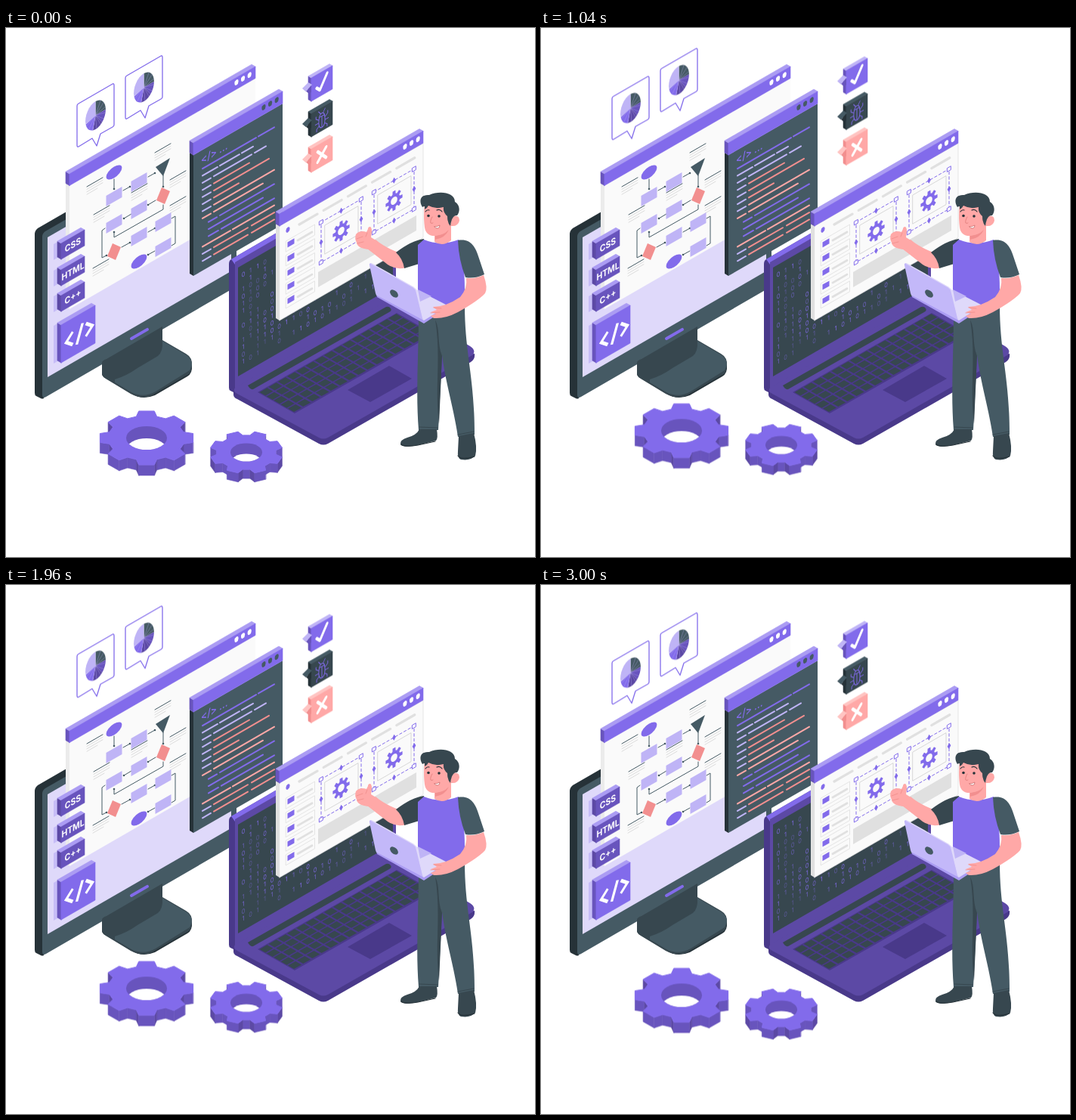
Animation of 700 by 700 pixels, one loop 3040 ms. Source, as an HTML page:

```html
<!DOCTYPE html>
<html lang="en">
<head>
<meta charset="utf-8">
<title>Isometric web development</title>
<style>
html, body { margin: 0; width: 100%; height: 100%; overflow: hidden; background: #fff; }
svg { display: block; width: 100vw; height: 100vh; }
text { font-family: Inter, Arial, sans-serif; }
.float { animation: float 3040ms linear -70ms infinite; }
@keyframes float {
  0%, 100% { transform: translateY(.6px); }
  50% { transform: translateY(-13.4px); }
}
</style>
</head>
<body>
<svg id="stage" viewBox="0 0 700 700" fill="none" stroke-linecap="round" stroke-linejoin="round"></svg>
<script>
const K = 0.577;
const C = {
  purple: '#826beb', light: '#ab9cf3', lilac: '#bfb4f6', pale: '#dfd9fa', deep: '#6854bd',
  plum: '#5c49a5', night: '#49398a', slate: '#455a64', dark: '#37474f', ink: '#263238',
  coral: '#f28f8f', pink: '#ffa8a7', blush: '#ffc4c2', paper: '#fafafa', grey: '#e0e0e0'
};

const path = (d, fill, extra = '') => `<path d="${d}" fill="${fill}" ${extra}/>`;
const line = (d, color, w = 1, extra = '') => `<path d="${d}" stroke="${color}" stroke-width="${w}" ${extra}/>`;
const quad = (x, y, w, h) => `M${x} ${y}l${w} ${-w * K}v${h}l${-w} ${w * K}z`;
const para = (x, y, w, h, fill, extra) => path(quad(x, y, w, h), fill, extra);
const seg = (x, y, w, color, width) => line(`M${x} ${y}l${w} ${-w * K}`, color, width);
const iso = (x, y, body) => `<g transform="matrix(.866 -.5 0 1 ${x} ${y})">${body}</g>`;

// Upright panel with a visible top and left side
function slab(x, y, w, h, d, front, top, side) {
  return path(`M${x} ${y}l${-d} ${-d * K}v${h}l${d} ${d * K}z`, side, `stroke="${side}" stroke-width=".6"`) +
    path(`M${x} ${y}l${-d} ${-d * K}l${w} ${-w * K}l${d} ${d * K}z`, top, `stroke="${top}" stroke-width=".6"`) +
    para(x, y, w, h, front, `stroke="${front}" stroke-width=".6"`);
}

const dots = (x, y, fill) => [0, 1, 2].map(i =>
  iso(x + i * 8.6, y - i * 4.9, `<ellipse rx="3" ry="3.5" fill="${fill}"/>`)).join('');

function gearPoints(R, r, rot, sy) {
  const pts = [];
  for (let i = 0; i < 8; i++) {
    for (const [a, q] of [[-15.5, r], [-9.5, R], [9.5, R], [15.5, r]]) {
      const t = (i * 45 + rot + a) * Math.PI / 180;
      pts.push([q * Math.cos(t), q * Math.sin(t) * sy]);
    }
  }
  return pts;
}
const poly = pts => 'M' + pts.map(p => p.map(n => n.toFixed(2)).join(' ')).join('L') + 'z';

function monitor() {
  return path('M38 273q0-5 4-8L295 119l10 7L52 272l-2 218q-2 1-4 0l-6-3q-2-1-2-4z', C.ink) +
    path('M48 276q0-4 4-7L305 124v218L53 488q-5 3-5-3z', C.slate) +
    para(55, 277, 243, 185, C.pale) +
    seg(166, 411, 21, C.purple, 4) +
    path('M127 443v14q0 4 4 6l35 21q14 9 31 2l43-25q7-4 6-15l-10-8z', C.ink) +
    path('M127 443q0-3 6-5l74-43v18l31 18q9 5 8 16t-6 12l-43 25q-14 9-32 0l-33-20q-5-3-5-7z', C.dark) +
    path('M144 465q16-5 30-15l27-16q7-6 6-20l32 19q11 8 4 20l-45 28q-16 9-32 1l-22-13z', C.slate);
}

function note(x, y) {
  let s = seg(x, y, 21, C.slate, 1);
  for (let i = 1; i < 4; i++) s += seg(x, y + i * 3.4, i === 3 ? 14 : 21, '#cfcfcf', .7);
  return s;
}

function flowchart() {
  let s = para(84, 208, 246, 164, C.paper) +
    path('M79 205l5 3v164l-5-3z', '#ebebeb') +
    slab(84, 193, 246, 15.5, 5, C.purple, C.light, C.deep) + dots(305, 72, '#fff');
  for (const [x, y] of [[107, 210], [197, 165], [217, 201], [217, 235], [116, 247], [166, 218], [115, 318]]) s += note(x, y);
  s += line('M143 200v13M155 215l9-5M188 197l9-5M208 195v15M198 228l-10 6M166 246l-10 6' +
    'M208 234v6L143 277v-7M131 265l-4 3v36l6-3M219 252l5-3v36l-5 3M153 290l11-6M188 270l9-5M197 295l-9 5', C.slate, 1);
  const heads = [[143, 213], [164, 210], [197, 192], [208, 210], [188, 234], [156, 252], [143, 270], [133, 301], [164, 284], [197, 265], [188, 300]];
  s += heads.map(([x, y]) => `<circle cx="${x}" cy="${y}" r="1.3" fill="${C.slate}"/>`).join('');
  for (const [x, y] of [[143, 223], [176, 204], [143, 259], [176, 240], [176, 276], [208, 257], [208, 290]])
    s += para(x - 10.5, y - 1, 21, 14, C.lilac);
  for (const [x, y] of [[143, 191], [176, 309]])
    s += iso(x, y, `<ellipse rx="12" ry="7.4" fill="${C.purple}"/>`);
  for (const [x, y] of [[208, 222], [143, 296]])
    s += path(`M${x - 9} ${y + 6}l7-17l11 5l-7 17z`, C.coral);
  return s + path('M198 184l19-12l-9 24z', C.slate);
}

function codeWindow() {
  const { purple: p, lilac: l, coral: c, pink: k } = C;
  const rows = [
    [p, 260, 331, p, 334, 355], [l, 260, 280, l, 283, 309, l, 312, 327],
    [l, 260, 271, l, 275, 325, l, 329, 344], [l, 260, 271, c, 275, 322],
    [l, 260, 271, c, 275, 348], [l, 260, 271, c, 275, 308], [l, 260, 271, k, 275, 355],
    [k, 260, 271, k, 275, 340], [p, 268, 279, p, 283, 355], [p, 268, 340],
    [p, 268, 281, p, 285, 355], [k, 260, 297, k, 300, 355],
    [l, 260, 271, c, 275, 320, c, 325, 355], [l, 260, 271, c, 275, 320, c, 325, 355]
  ];
  let s = path('M243 165l5 3v160l-5-3z', C.ink) + para(248, 168, 118, 160, C.slate) +
    slab(248, 152, 118, 16, 5, C.purple, C.light, C.deep) + dots(341, 105, C.slate) +
    iso(258, 180, `<text font-size="14" font-weight="600" fill="${p}">&lt;/&gt; …</text>`);
  rows.forEach((row, j) => {
    for (let i = 0; i < row.length; i += 3) {
      const x = row[i + 1];
      s += seg(x, 193 + j * 9.4 - (x - 248) * K, row[i + 2] - x, row[i], 2);
    }
  });
  return s;
}

function tag(y, w, h, front, side) {
  return para(63, y + 1, w, h, C.lilac, 'opacity=".75"') +
    slab(73, y, w, h, 5, front, C.light, side);
}

function tags() {
  let s = '';
  for (const [y, label] of [[285, 'CSS'], [320, 'HTML'], [354, 'C++']])
    s += tag(y, 31, 21, C.deep, C.plum) + iso(88.5, y + 6,
      `<text font-size="12" font-weight="700" fill="#fff" text-anchor="middle">${label}</text>`);
  return s + tag(393, 45, 50, C.purple, C.deep) + iso(97, 405,
    line('M-10-8L-20 1L-10 9M-4 12L5-12M10-9L20-1L10 8', '#fff', 4.2, 'stroke-linecap="butt" stroke-linejoin="miter"'));
}

function laptop() {
  let s = path('M295 312q0-4 3-6L508 184l8 8v170L303 483l-6-3q-2-1-2-4z', C.night) +
    path('M298 306L508 184l8 6L303 313z', C.purple) +
    para(303, 310, 213, 171, C.plum) + para(307, 317, 205, 144, C.dark);
  let seed = 7;
  const rand = () => (seed = seed * 16807 % 2147483647) / 2147483647;
  for (let i = 0; i < 20; i++) {
    const x = 314 + i * 9.5;
    for (let j = 0; j < 13; j++) {
      const bit = rand() < .5 ? 0 : 1, a = rand();
      if (a < .25) continue;
      s += iso(x, 329 + j * 9.6 - i * 5.48,
        `<text font-size="8.5" text-anchor="middle" fill="${C.purple}" opacity="${(.2 + .8 * a).toFixed(2)}">${bit}</text>`);
    }
  }
  s += path('M301 479v6q0 4 5 6l108 59q6 3 12 0l189-108q6-4 5-11z', C.night) +
    path('M303 482Q300 477 306 474L500 363Q508 358 516 363L614 421Q623 427 617 433L426 542Q420 545 414 542L306 484z', C.plum) +
    path('M320 473l183-104q4-1 6 2t-2 5L327 478q-4 1-7-5z', C.dark) +
    path('M333 482L517 377L566 405L382 510z', C.night);
  for (let i = 0; i < 15; i++) for (let j = 0; j < 5; j++) {
    const x = 335.5 + i * 12.2 + j * 9.4, y = 482 - i * 7 + j * 5.4;
    s += path(`M${x} ${y}l10-5.7l7.9 4.5l-10 5.7z`, C.dark);
  }
  return s + path('M452 479L507 447L537 464L482 495z', C.night);
}

function selection(x, y) {
  const w = 53, h = 53, r = w * K, m = r / 2;
  let s = para(x + 5, y + 4, 44, 38, C.paper, 'stroke="#cfcfcf" stroke-width=".8"') +
    line(quad(x, y, w, h), C.purple, 1, 'stroke-dasharray="3.5 3"');
  for (const [a, b] of [[0, 0], [w, -r], [w, h - r], [0, h]])
    s += para(x + a - 2.3, y + b - 1, 4.6, 4.8, '#fff', `stroke="${C.purple}"`);
  for (const [a, b] of [[w / 2, -m], [w / 2, h - m], [0, h / 2], [w, h / 2 - r]])
    s += path(`M${x + a} ${y + b - 4}l2.4 3l-2.4 5l-2.4-3z`, C.purple);
  return s + iso(x + 26.5, y + 11.5,
    path(poly(gearPoints(13, 9, 0, 1)), C.purple) + `<circle r="5" fill="${C.paper}"/>`);
}

function editor() {
  let s = path('M357 259l5 3v125l-5-3z', C.grey) + para(362, 262, 190, 125, C.paper, `stroke="${C.grey}" stroke-width=".8"`) +
    slab(362, 246, 190, 16, 5, C.purple, C.light, C.deep) + dots(528, 157, '#fff') +
    iso(373, 267, `<ellipse rx="3" ry="3.4" fill="${C.purple}"/>`);
  for (let i = 0; i < 5; i++) {
    s += seg(388 + i * 32.2, 260 - i * 18.6, 24, C.grey, 3.2);
    const y = 284 + i * 18.7;
    s += para(370.5, y - 2, 38, 14, C.paper, `stroke="${C.grey}" stroke-width=".8"`) +
      para(372.5, y - .5, 9, 7, C.purple) + seg(386, y - 3, 19, C.grey, 2.8);
  }
  return s + para(413, 323, 130, 20, C.grey) + selection(417, 257) + selection(487, 217);
}

function man() {
  return path('M546 383l61-16c0 63 13 95 13 171l-22 3c-6-40-16-70-21-108l-5 99h-26c-4-50 0-100 0-149z', C.slate) +
    path('M568 386c7 14 2 31 9 48l-4 90c-6-45 3-88-5-138z', C.dark) +
    path('M547 531h23q2 12-1 15l-24 6q-20 4-23-1q-1-6 9-9q12-3 16-11z', C.dark) +
    path('M599 540l20-4q5 19 2 30q-6 7-19 5q-5-2-4-11z', C.dark) +
    line('M547 528l24 1M598 538l21-4', C.dark, 1) +
    line('M523 551q4 4 22 1l23-5M598 566q4 6 22 1', C.ink, 1.2) +
    path('M522 298Q502 291 489 280L478 292L505 313Q517 321 529 317z', C.pink) +
    path('M463 273q5-6 14-3l2-4q0-3 3-3q2 1 2 6l-1 8l8 5q-4 10-10 11q-16-1-17-9q-3-5-1-11z', C.pink) +
    line('M464 279l8-3M465 285l8-2M478 271l-2 5', '#ee8d8b', .8) +
    path('M553 279q-16 2-37 18q9 8 11 21l23-7z', C.dark) +
    path('M553 280q22 9 46 0q9 22 8 87l-17 8l-45-12v-76z', C.purple) +
    path('M567 264l22-5v22q-11 9-22 2z', C.pink) +
    path('M568 274q9 1 18-7q-5 11-18 13z', '#f28f8f') +
    path('M554 231q-2 18 0 33q2 12 15 11q15-2 20-13q9 1 11-7q0-8-9-6l-4-18z', C.pink) +
    path('M551 237c-5-8-3-17 9-16c13-6 34-4 34 9c7 4 7 13 3 18q-7-1-9 14q-4-4-4-13q-6-5-5-12q-11 3-20-2q-2 4-5 5v-4q-2 0-3 1z', C.dark) +
    line('M555 243q2-3 5-2M570 241q4-2 7 2', C.ink, 1.2) +
    line('M564 250q-3 5-2 8q2 1 3 0', '#e07f7d', .9) +
    `<circle cx="559" cy="248.500" r="1.8" fill="${C.ink}"/><circle cx="573" cy="249" r="1.8" fill="${C.ink}"/>` +
    path('M567 263q4 0 7-2q0 4-3 4q-3 0-4-2z', '#fff', `stroke="#c96969" stroke-width=".8"`) +
    path('M598 281c17-3 23 9 27 21l8 24q-12 6-25 4q-9-23-10-49z', C.slate) +
    path('M541 345L584 367L553 389z', C.pale) +
    path('M545 346l18 9l-15 7z', C.lilac) +
    path('M481 314q-1-4 4-2l54 31q3 2 4 5l10 42l-61-34q-2-1-3-5z', '#c3b8f9') +
    line('M484 312l55 31q3 2 4 5l10 41', C.pale, 1.4) +
    path('M553 387l32-20v3l-32 21l-62-35v-2z', C.light) +
    `<ellipse cx="513.500" cy="351.500" rx="4" ry="6.300" transform="rotate(-48 513.5 351.5)" fill="${C.slate}"/>` +
    path('M609 331q13 1 23-4q6 17 2 24q-9 10-36 25q-17 9-32 8l-4-3l7-3l-7-2l8-3l-5-4q17 0 36-13q10-12 8-25z', C.pink) +
    line('M562 377l12-1M566 370l10 1', '#ee8d8b', .8);
}

function pie(x, y) {
  const parts = [[-90, 0, C.slate], [0, 50, C.deep], [50, 105, C.plum], [105, 165, C.purple], [165, 270, C.lilac]];
  const at = a => [15.5 * Math.cos(a * Math.PI / 180), 18.5 * Math.sin(a * Math.PI / 180)].map(n => n.toFixed(2)).join(' ');
  let s = '';
  for (const [a, b, fill] of parts) s += path(`M0 0L${at(a)}A15.5 18.5 0 0 1 ${at(b)}z`, fill);
  for (let a = -60; a < 270; a += 24) s += line(`M0 0L${at(a)}`, C.lilac, .3);
  return iso(x, y, s);
}

const bubble = (x, y) =>
  path(`M${x} ${y + 2}q0-2 2-3l45-26q2-1 2 2v52q0 2-2 3l-16 9l-5 16l-6-10l-18 11q-2 1-2-2z`,
    '#fff', `stroke="${C.purple}" stroke-width="1.3"`) + pie(x + 24.5, y + 14.5);

function badge(y, front, top, side, icon) {
  return slab(404, y, 28, 31, 4, front, top, side) +
    path(`M392 ${y + 14}l8-8l5 3l-8 9z`, top) + path(`M392 ${y + 14}l5 4l7-8v9l-4 1z`, side) +
    iso(418, y + 7.5, icon);
}

const bug = line('M-4-4C-6 5-4 11 0 11S6 5 4-4zM-4-4Q-3-8 0-8T4-4M0-4V11M-2-8l-3-4M2-8l3-4' +
  'M-5-1l-4-3v-3M5-1l4-3v-3M-5 3h-5M5 3h5M-4 7l-4 3v3M4 7l4 3v3', C.purple, 1.1);

function gear(cx, cy, R, r, rot, depth, hole) {
  const pts = gearPoints(R, r, rot, K).map(([x, y]) => [x + cx, y + cy]);
  const faces = pts.map((p, i) => [p, pts[(i + 1) % pts.length]])
    .filter(([a, b]) => a[0] > b[0]).sort((a, b) => a[0][1] + a[1][1] - b[0][1] - b[1][1]);
  let s = '';
  for (const [a, b] of faces) {
    const tilt = (b[1] - a[1]) / (a[0] - b[0]);
    const fill = Math.abs(tilt) > .75 ? C.plum : C.deep;
    s += path(poly([a, b, [b[0], b[1] + depth], [a[0], a[1] + depth]]), fill, `stroke="${fill}" stroke-width=".6"`);
  }
  const id = 'hole' + cx, ring = `cx="${cx}" rx="${hole}" ry="${hole * K}"`;
  return s + path(poly(pts), C.purple, `stroke="${C.purple}" stroke-width="1"`) +
    `<clipPath id="${id}"><ellipse ${ring} cy="${cy}"/></clipPath><ellipse ${ring} cy="${cy}" fill="${C.deep}"/>` +
    `<ellipse ${ring} cy="${cy + depth + 2}" fill="#fff" clip-path="url(#${id})"/>`;
}

function floating() {
  return '<g class="float">' + bubble(94, 101) + bubble(158, 64) +
    badge(66, C.purple, C.lilac, C.deep, line('M-8 2L-3 7L8-10', '#fff', 4)) +
    badge(113, C.dark, C.slate, C.ink, bug) +
    badge(160, C.pink, C.blush, C.coral, line('M-6.500-7L6.500 7M-6.500 7L6.500-7', '#fff', 4)) +
    gear(186, 542.5, 62.5, 51, 0, 14, 27) + gear(318, 561.5, 48.5, 39.5, 22.5, 12, 21) + '</g>';
}

document.getElementById('stage').innerHTML = monitor() + flowchart() + tags() +
  codeWindow() + laptop() + editor() + man() + floating();
</script>
</body>
</html>
```
